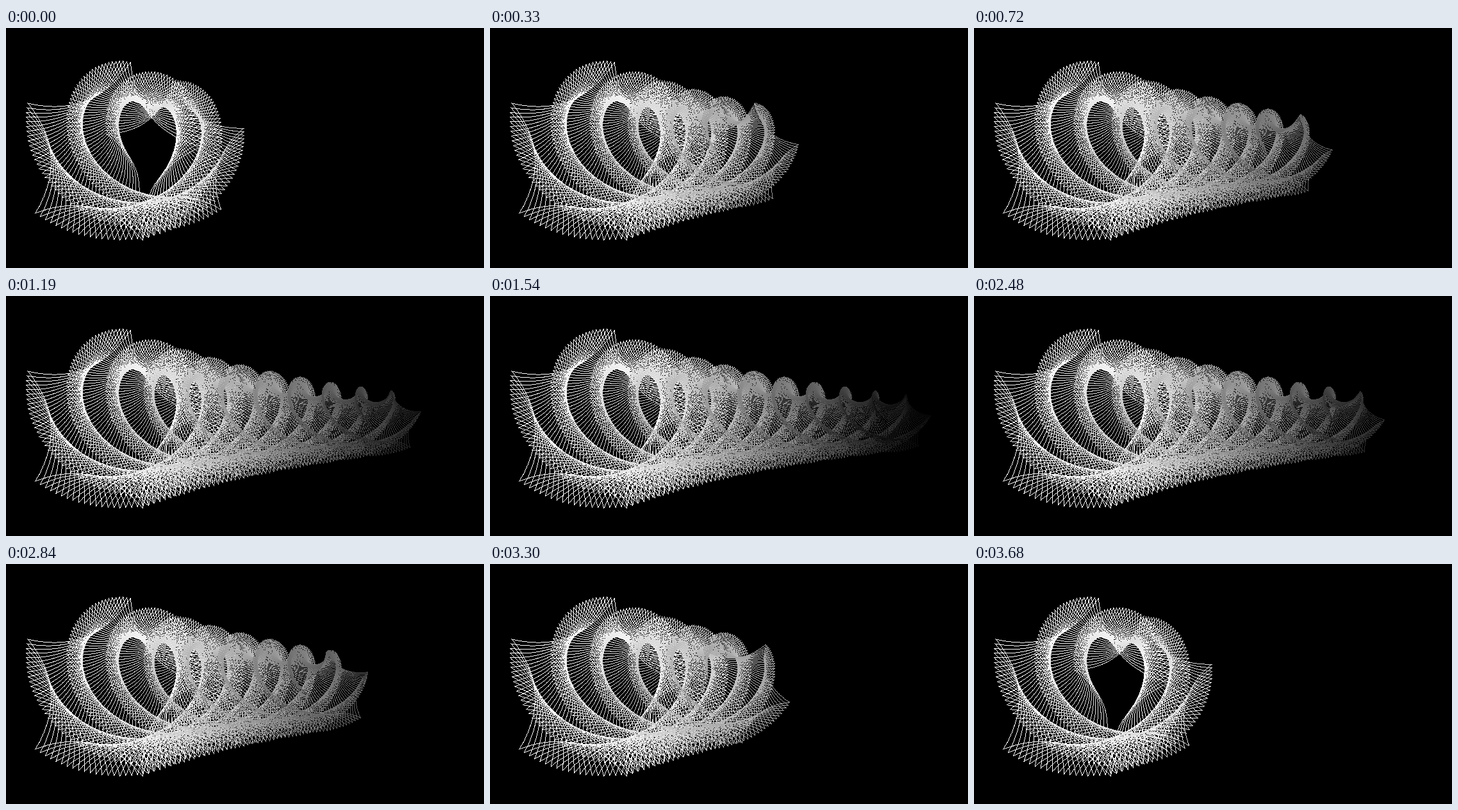
Write an HTML page with a canvas that moves like this. It is 746 px wide and 376 px high and loops after 3.78 s.

```html
<!DOCTYPE html>
<html lang="en">
<head>
<meta charset="utf-8">
<title>Spiral</title>
<style>
html, body { margin: 0; width: 100%; height: 100%; overflow: hidden; background: #000; }
canvas { display: block; }
</style>
</head>
<body>
<canvas id="stage" width="746" height="376"></canvas>
<script>
const W = 746, H = 376;
const ctx = document.getElementById('stage').getContext('2d');
const image = ctx.createImageData(W, H);
const pixels = new Uint32Array(image.data.buffer);

const LOOP = 3780, STEP = 56.7; // ms
const PEAK = 1788;              // time of the longest spiral
const FIRST = 53, MOST = 248;   // index of the last copy, shortest and longest
const FADE = 250;               // copy at which the lines reach black
const SIDES = 5, PARTS = 24;
const RAD = Math.PI / 180, TURN = 2 * Math.PI / SIDES;

// The spiral slows towards its peak and snaps back at the ends
function lastCopy(t) {
  const u = Math.abs(t - PEAK) / PEAK;
  const n = MOST - 180 * u ** 1.655 - 17 * u ** 24;
  return Math.round(Math.max(FIRST, n));
}

// One-pixel line without smoothing
function line(x0, y0, x1, y1, color) {
  const n = Math.max(1, Math.ceil(Math.max(Math.abs(x1 - x0), Math.abs(y1 - y0))));
  for (let i = 0; i < n; i++) {
    const x = Math.round(x0 + (x1 - x0) * i / n);
    const y = Math.round(y0 + (y1 - y0) * i / n);
    pixels[y * W + x] = color;
  }
}

function curve([ax, ay], [bx, by], [cx, cy], color) {
  let px = ax, py = ay;
  for (let i = 1; i <= PARTS; i++) {
    const t = i / PARTS, s = 1 - t;
    const x = s * s * ax + 2 * s * t * bx + t * t * cx;
    const y = s * s * ay + 2 * s * t * by + t * t * cy;
    line(px, py, x, y, color);
    px = x;
    py = y;
  }
}

// Five-pointed outline with sides bowed inwards
function drawCopy(i) {
  const x = 158 + 2.02 * i;
  const y = 195.5 + 0.01 * i;
  const r = 147 * 0.995 ** i;
  const start = (-75.9 - 3.03 * i) * RAD;
  const at = (a, d) => [x + d * Math.cos(a), y + d * Math.sin(a)];
  const v = Math.round(255 * (1 - (i / FADE) ** 1.25));
  const color = (0xff000000 | v * 0x010101) >>> 0;
  for (let s = 0; s < SIDES; s++) {
    const a = start + s * TURN;
    curve(at(a, r), at(a + TURN / 2, r * 0.395), at(a + TURN, r), color);
  }
}

let shown = -1;
function draw(now) {
  const t = now % LOOP;
  const last = lastCopy(STEP * Math.floor((t + 12) / STEP));
  if (last === shown) return;
  shown = last;
  pixels.fill(0xff000000);
  for (let i = 0; i <= last; i++) drawCopy(i);
  ctx.putImageData(image, 0, 0);
}

const begin = performance.now();
function frame() {
  draw(performance.now() - begin);
  requestAnimationFrame(frame);
}
frame();
</script>
</body>
</html>
```
